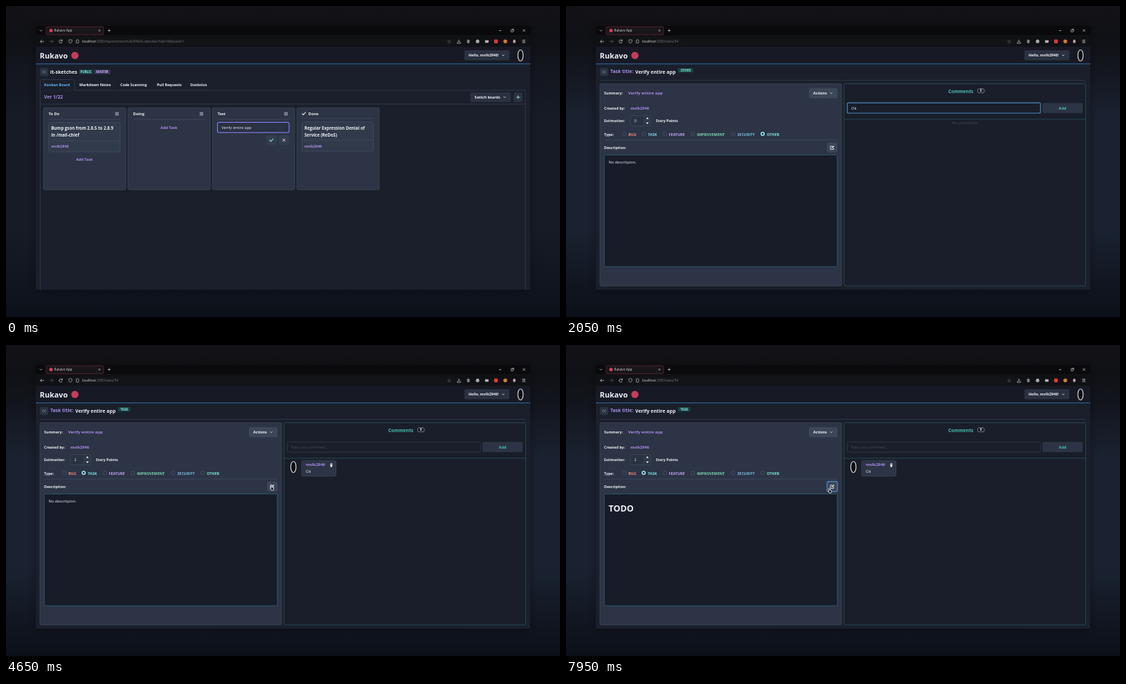
Recreate the animation shown at these times as an HTML page with a canvas. Size 800x450 px, loop 8 s.

```html
<!DOCTYPE html>
<html lang="en">
<head>
<meta charset="utf-8">
<title>Task board</title>
<style>
html, body { margin: 0; width: 100%; height: 100%; overflow: hidden; background: #0e1118; }
canvas { display: block; width: 800px; height: 450px; }
</style>
</head>
<body>
<canvas id="stage"></canvas>
<script>
const LOOP = 8000, STEP = 50;
const USER = 'mvlk2946', APP = 'Rukavo', REPO = 'it-sketches', TASK = 'Verify entire app';
const C = {
  page: '#1a1f2b', panel: '#2c3445', line: '#343d4e', edge: '#434d60', button: '#2a3140', raised: '#3d4657',
  text: '#eceff4', purple: '#a88be6', teal: '#4bbfb5', mint: '#81e6d9', tealLine: '#28545e', focus: '#4b86b8', dim: '#434c5b'
};
const at = { card: 250, leave: 900, load: 1000, actions: 1200, input: 1550, post: 2800, one: 3350, two: 3500,
  kind: 4050, edit: 4700, drag: 5150, type: 5900, preview: 7700 };
// time, x, y, pointer shape held until the next entry
const path = [
  [0, 383, 196, ''], [150, 383, 196, 'hand'], [300, 383, 196, 'hand'], [800, 362, 185, 'hand'], [900, 362, 185, 'arrow'],
  [1000, 362, 185, 'arrow'], [1200, 371, 128, 'hand'], [1250, 371, 128, 'arrow'], [1450, 434, 144, 'beam'],
  [1700, 450, 148, ''], [2200, 450, 148, 'beam'], [2550, 728, 150, 'hand'], [2850, 728, 150, 'arrow'],
  [3300, 117, 164, 'hand'], [3450, 117, 164, 'hand'], [3600, 117, 175, 'hand'], [3700, 117, 175, 'arrow'],
  [3950, 113, 187, 'hand'], [4200, 113, 187, 'arrow'], [4600, 384, 207, 'hand'], [4850, 384, 207, 'beam'],
  [5150, 102, 224, 'beam'], [5400, 44.6, 223, 'arrow'], [5850, 44.6, 223, ''], [6950, 44.6, 223, 'arrow'],
  [7600, 381, 211, 'hand'], [8000, 381, 211, 'hand']
];

const canvas = document.getElementById('stage');
const ctx = canvas.getContext('2d');
const ratio = window.devicePixelRatio || 1;
canvas.width = 800 * ratio;
canvas.height = 450 * ratio;

// y is the middle of the capitals
function text(s, x, y, size = 5.3, color = C.text, weight = 700, align = 'left') {
  ctx.font = `${weight} ${size}px "Open Sans", "Noto Sans", sans-serif`;
  ctx.textAlign = align;
  ctx.fillStyle = color;
  ctx.fillText(s, x, y + size * 0.36);
  return ctx.measureText(s).width;
}
const body = (s, x, y, color = C.text, align = 'left') => text(s, x, y, 5.65, color, 500, align);
function box(x, y, w, h, fill, stroke, r = 2, lw = 0.8) {
  ctx.beginPath();
  ctx.roundRect(x, y, w, h, r);
  if (fill) { ctx.fillStyle = fill; ctx.fill(); }
  if (stroke) { ctx.strokeStyle = stroke; ctx.lineWidth = lw; ctx.stroke(); }
}
function stroke(color, lw, ...p) {
  ctx.beginPath();
  for (let i = 0; i < p.length; i += 2) ctx.lineTo(p[i], p[i + 1]);
  ctx.strokeStyle = color;
  ctx.lineWidth = lw;
  ctx.stroke();
}
function oval(x, y, rx, ry, fill, line, lw = 0.8) {
  ctx.beginPath();
  ctx.ellipse(x, y, rx, ry, 0, 0, Math.PI * 2);
  if (fill) { ctx.fillStyle = fill; ctx.fill(); }
  if (line) { ctx.strokeStyle = line; ctx.lineWidth = lw; ctx.stroke(); }
}
function fillPath(color, d) { ctx.fillStyle = color; ctx.fill(new Path2D(d)); }
const rule = (x, y, x2, color = C.line, lw = 0.8) => stroke(color, lw, x, y, x2, y);
const chevron = (x, y, s = 1.5, color = C.text) => stroke(color, 0.8, x - s, y - s / 2, x, y + s / 2, x + s, y - s / 2);
const plus = (x, y, s, color, lw = 0.8) => { rule(x - s, y, x + s, color, lw); stroke(color, lw, x, y - s, x, y + s); };
const check = (x, y, color) => stroke(color, 1.1, x - 2.6, y, x - 0.8, y + 1.9, x + 2.7, y - 2);
function cross(x, y, s, color, lw = 0.8) {
  stroke(color, lw, x - s, y - s, x + s, y + s);
  stroke(color, lw, x + s, y - s, x - s, y + s);
}
function bars(x, y, s, color) { for (const d of [-1.8, 0, 1.8]) rule(x - s, y + d, x + s, color, 0.8); }
function badge(s, x, y, w, fill, color) {
  box(x, y, w, 6.4, fill, null, 1.2);
  text(s, x + w / 2, y + 3.2, 4.4, color, 700, 'center');
}
const avatar = (x, y) => oval(x, y, 3.8, 8, '#090b0f', '#e4e6e8', 1.1);

function backdrop(mid) {
  const g = ctx.createLinearGradient(0, 0, 0, 450);
  [[0, '#121217'], [0.1, '#101116'], [0.2, '#13161e'], [0.36, mid], [0.72, mid], [0.92, '#0f141e'], [1, '#0b1018']]
    .forEach(s => g.addColorStop(...s));
  ctx.fillStyle = g;
  ctx.fillRect(0, 0, 800, 450);
  ctx.save();
  ctx.shadowColor = 'rgba(0,0,0,.35)';
  ctx.shadowBlur = 12 * ratio;
  box(43, 29, 714, 382.5, C.page, null, 0);
  ctx.restore();
  rule(43, 411.3, 757, '#0a0c11', 1);
}

function browser(board) {
  const grey = '#b8b9bd';
  box(43, 29, 714, 13, '#0a0a0c', null, 0);
  box(43, 42, 714, 17, '#101115', null, 0);
  box(86, 45.5, 562, 11.5, '#131418', null, 1.5);
  box(58, 30, 83, 11.6, '#18161b', '#6d2836', 1.5, 0.7);
  chevron(50.5, 35.5, 1.7, grey);
  oval(65, 35.5, 2.5, 2.5, '#d8405c');
  text(APP + ' App', 69.5, 35.6, 4.7, '#dddde0', 400);
  cross(134.8, 35.5, 1.4, grey, 0.7);
  plus(149, 35.5, 2.1, grey);
  rule(712, 35.6, 715.5, grey);
  box(729.2, 34.5, 3, 3, null, grey, 0, 0.7);
  stroke(grey, 0.7, 730.5, 33.5, 733.2, 33.5, 733.2, 36.3);
  cross(748, 35.5, 1.8, grey);

  rule(49.5, 51.3, 55, grey);
  stroke(grey, 0.8, 51.9, 48.9, 49.5, 51.3, 51.9, 53.7);
  rule(62.5, 51.3, 68, '#5b5c60');
  stroke('#5b5c60', 0.8, 65.6, 48.9, 68, 51.3, 65.6, 53.7);
  ctx.beginPath();
  ctx.arc(79, 51.3, 2.3, 0.3, 5.6);
  ctx.strokeStyle = grey;
  ctx.stroke();
  stroke(grey, 0.8, 81.4, 48.4, 81.4, 50.6, 79.2, 50.6);
  stroke(grey, 0.7, 93, 48.5, 95.3, 49.4, 95.1, 52, 93, 54.2, 90.9, 52, 90.7, 49.4, 93, 48.5);
  box(101.5, 49, 3.4, 4.6, null, grey, 0.5, 0.7);
  const w = text('localhost', 110, 51.4, 4.75, '#dadade', 400);
  const url = board ? `:3000/repositories/${USER}/${REPO}/?tab=0&board=1` : ':3000/tasks/54';
  text(url, 110 + w, 51.4, 4.75, '#73747a', 400);

  text('☆', 640, 51.1, 7, grey, 400, 'center');
  stroke(grey, 0.8, 654, 48.6, 654, 52.3);
  stroke(grey, 0.8, 652.4, 50.8, 654, 52.4, 655.6, 50.8);
  stroke(grey, 0.8, 651.5, 52.5, 651.5, 54, 656.5, 54, 656.5, 52.5);
  box(665.8, 48.8, 3.6, 5, '#85868a', null, 1);
  oval(681, 51.2, 2.5, 2.6, '#a9aaae');
  box(691.7, 49.5, 5.2, 3.8, '#b2b3b7', null, 1);
  box(704.8, 48.5, 5.4, 5.4, '#d83a3a', null, 1);
  oval(721, 51.2, 2.7, 2.7, '#e07b28');
  oval(734, 51.2, 1.9, 2.6, '#b9a2a2');
  bars(747.7, 51.2, 2.3, grey);
}

function appHeader() {
  box(43, 59, 714, 24.8, '#171a24', null, 0);
  text(APP, 48.8, 71.8, 10.8);
  oval(99.5, 71.5, 5.2, 5.2, '#c63c58');
  box(662, 64, 65, 14.5, C.button);
  text(`Hello, ${USER}!`, 668, 71.5);
  chevron(718, 71.3);
  avatar(743, 71.5);
  rule(43, 83.8, 757, '#2f6ba5', 1.1);
  box(49, 89.5, 12, 12, C.button);
  for (const x of [54.5, 57.5]) stroke('#9aa3b2', 0.8, x, 93.4, x - 2, 95.5, x, 97.6);
}

function card(x, y, lines) {
  const h = 22 + lines.length * 10.2;
  box(x, y, 103, h, '#313a4b', C.edge, 2);
  lines.forEach((s, i) => text(s, x + 3.4, y + 8.6 + i * 10, 6.15));
  rule(x, y + h - 16, x + 103, C.edge, 0.6);
  text(USER, x + 3.4, y + h - 7.5, 5.3, C.purple);
}

function board(t) {
  text(REPO, 63.8, 95, 7.2);
  badge('PUBLIC', 105.5, 92, 20, '#1f4549', C.mint);
  badge('MASTER', 127, 92, 24, '#393258', '#c9b3f3');
  rule(49, 122, 750);
  box(49.4, 106.5, 49.6, 15.6, C.page, C.line, 1.5);
  rule(50, 122, 98.6, C.page, 1.4);
  [['Kanban Board', 55], ['Markdown Notes', 106], ['Code Scanning', 165], ['Pull Requests', 218], ['Statistics', 266]]
    .forEach(([s, x], i) => text(s, x, 114.2, 5.3, i ? C.text : '#63b3ed'));
  stroke(C.line, 0.8, 49.4, 122, 49.4, 411);
  stroke(C.line, 0.8, 750, 122, 750, 411);
  text('Ver 1/22', 55, 131.8, 6.7, C.purple);
  rule(49, 142, 750);
  box(670.5, 125, 58.5, 14, C.button);
  text('Switch boards', 676.5, 132);
  chevron(720, 131.9);
  box(733, 125, 13, 14, C.button);
  plus(739.6, 132, 2.8, '#9adbe6', 0.9);

  ['To Do', 'Doing', 'Test', 'Done'].forEach((name, i) => {
    const x = 54 + i * 122;
    const done = i === 3;
    box(x, 147.3, 119, 118.6, C.panel, '#3e4859', 2);
    text(name, x + (done ? 16.5 : 7.5), 155.8, 5.7);
    if (done) check(x + 10.2, 155.5, C.text);
    else bars(x + 106.3, 156, 2.6, '#cbd2dc');
    rule(x + 7.5, done ? 162.8 : 164, x + 111, C.edge, 0.7);
  });
  const add = (x, y) => text('Add Task', x, y, 5.4, C.purple, 700, 'center');
  card(61.8, 168.6, ['Bump gson from 2.8.5 to 2.8.9', 'in /mail-chief']);
  card(427.5, 167.7, ['Regular Expression Denial of', 'Service (ReDoS)']);
  add(113.3, 221.8);
  add(235.3, 176);
  if (t < at.card) {
    box(305.4, 168.3, 103.4, 14.8, '#2a3142', '#7d78de', 2, 1.2);
    body(TASK, 311.3, 176);
    box(376, 187, 15, 14, '#343d4e');
    check(383.3, 194, C.mint);
    box(394, 187, 14.7, 14, '#343d4e');
    cross(401.3, 194, 2, C.text, 0.9);
  } else {
    card(305.4, 168.6, [TASK]);
    add(357, 211.6);
  }
}

function editIcon(x, y) {
  stroke(C.text, 0.8, x + 0.3, y - 2, x - 2.5, y - 2, x - 2.5, y + 2.7, x + 2, y + 2.7, x + 2, y + 0.3);
  stroke(C.text, 1.4, x - 0.6, y + 0.8, x + 2.5, y - 2.4);
}
function eyeIcon(x, y) {
  oval(x, y, 3.3, 2.2, C.text);
  oval(x, y, 1.1, 1.1, '#3d4657');
}

function description(t, mouse) {
  const editing = t >= at.edit && t < at.preview;
  const focused = t >= at.preview;
  text('Description:', 55, 205.2);
  box(377, 197.5, 15, 14.6, C.raised, focused ? C.focus : null, 2, 1.3);
  (editing ? eyeIcon : editIcon)(384.4, 204.8);
  box(55.2, 215.4, 336.6, 161.8, '#171c28', editing ? '#4f8fc0' : '#2f6678', 1.5, 0.8);
  if (focused) return text('TODO', 61.5, 236.2, 12.5);
  if (!editing) return body('No descritpion.', 61.5, 226.3);
  if (t >= at.type) {
    const typed = '# TODO'.slice(0, 1 + Math.floor((t - at.type) / 150));
    const w = body(typed, 61.5, 223);
    if ((t - at.type) % 1000 < 500) stroke(C.text, 0.6, 62.2 + w, 219.8, 62.2 + w, 226.4);
    return;
  }
  if (t >= at.drag) {
    const left = Math.min(102, Math.max(61.3, mouse.x));
    box(left, 218.8, 102 - left, 8.6, '#1b6dbb', null, 0);
  }
  body('No descritpion.', 61.5, 223);
}

function details(t, mouse) {
  const kind = t < at.kind ? 'OTHER' : 'TASK';
  text('Task title:', 64, 95, 6.9, C.purple);
  text(TASK, 100, 95, 7);
  badge(kind, 162, 89.9, kind === 'TASK' ? 17.5 : 21.5, '#1f4549', C.mint);
  rule(49, 107.6, 750);

  box(49, 112.4, 349, 292.6, C.panel, '#3d485b', 2);
  text('Summary:', 55, 126.3);
  text(TASK, 89.8, 126.3, 6, C.purple);
  const open = t >= at.actions && t < at.input;
  box(351, 118.8, 41, 14.6, C.raised, open ? C.focus : null, 2, 1.3);
  text('Actions', 357, 126.3);
  chevron(383, 126.1);
  text('Created by:', 55, 147.6);
  text(USER, 93, 147.6, 5.65, C.purple);
  text('Estimation:', 55, 166.3);
  const typing = t >= at.one && t < at.kind - 100;
  box(93, 158.6, 29, 14.8, '#2a3242', typing ? C.focus : '#414c5e', 2, typing ? 1.3 : 0.8);
  body(t < at.one ? '0' : t < at.two ? '1' : '2', 98.6, 166.3);
  if (typing) stroke(C.text, 0.6, 102.5, 163, 102.5, 169.4);
  stroke('#414c5e', 0.7, 113, 159, 113, 173);
  rule(113, 166, 122, '#414c5e', 0.7);
  fillPath(C.text, 'M115.4 163.4 L117.5 160.9 L119.6 163.4Z M115.4 168.6 L117.5 171.1 L119.6 168.6Z');
  text('Story Points', 129.8, 166.3);
  text('Type:', 55, 185.6);
  [['BUG', 84, '#ee8a84'], ['TASK', 112.2, '#83d9e6'], ['FEATURE', 142.5, '#c0a5ef'], ['IMPROVEMENT', 183, '#7fd1b0'],
    ['SECURITY', 241.4, '#79bde9'], ['OTHER', 284, C.mint]].forEach(([name, x, color]) => {
    if (name === kind) {
      oval(x, 185, 3, 3, '#8de0ea');
      oval(x, 185, 1.3, 1.3, '#1d2a38');
    } else oval(x, 185, 2.6, 2.6, null, '#4b566a', 0.8);
    text(name, x + 6, 185.6, 5.4, color);
  });
  rule(55, 194, 392, C.edge);
  description(t, mouse);
}

function comments(t) {
  box(401.6, 112.4, 348.8, 292.6, '#191e2a', C.tealLine, 2, 0.8);
  text('Comments', 552, 123.4, 6.7, C.teal);
  box(594.4, 119.7, 9.6, 6, null, '#8b95a5', 2, 0.7);
  text('0', 599.2, 122.8, 4.3, C.text, 700, 'center');
  const focused = t >= at.input && t < 2600;
  box(406.2, 140.2, 279, 14.8, null, focused ? C.focus : '#303b4b', 2, focused ? 1.2 : 0.8);
  const typed = t >= 1850 && t < 2650 ? (t < 2000 ? 'O' : 'Ok') : '';
  body(typed || 'Add new comment...', 412, 148, typed ? C.text : C.dim);
  const hot = t >= 2600 && t < 3250;
  box(688, 140.2, 58, 14.8, hot ? C.raised : C.panel, hot ? C.focus : null, 2, 1.3);
  text('Add', 717, 147.8, 5.5, C.teal, 700, 'center');
  rule(402, 163.8, 750, C.tealLine);
  if (t < at.post) return body('No comments', 576, 169.4, C.dim, 'center');
  avatar(415, 176.5);
  box(427, 167.2, 49.5, 22.6, C.panel, '#3e4859', 2);
  text(USER, 433, 173.2, 5.85, C.purple);
  fillPath(C.text, 'M467.8 171.7h3.9v.8h-3.9z M468.2 172.9h3.1l-.3 3.7h-2.5z M469.1 171h1.3v.7h-1.3z');
  body('Ok', 433, 182.8);
}

function pointerAt(t) {
  const i = Math.max(0, path.findIndex(p => p[0] > t) - 1);
  const [t0, x0, y0, shape] = path[i];
  const [t1, x1, y1] = path[i + 1];
  const k = (t - t0) / (t1 - t0);
  const e = k * k * (3 - 2 * k);
  return { x: x0 + (x1 - x0) * e, y: y0 + (y1 - y0) * e, shape };
}
function pointer({ x, y, shape }) {
  if (!shape) return;
  ctx.save();
  ctx.translate(x, y);
  if (shape === 'beam') {
    stroke('#e6e8ec', 0.8, 0, -3, 0, 3);
    rule(-1.5, -3.2, 1.5, '#e6e8ec');
    rule(-1.5, 3.2, 1.5, '#e6e8ec');
  } else {
    const d = shape === 'arrow' ? 'M-1 -3.2 L3.2 .4 L-1 3.2Z'
      : 'M-1.4 -3.2 Q-.6 -4 0 -3 L.3 -1 Q2.4 -1 2.4 .4 L2 2.8 Q.4 3.8 -1 2.8 L-2.4 .4 Q-2.2 -.4 -1.2 .2Z';
    const p = new Path2D(d);
    ctx.fillStyle = '#11141b';
    ctx.fill(p);
    ctx.strokeStyle = '#eef0f3';
    ctx.lineWidth = 0.9;
    ctx.stroke(p);
  }
  ctx.restore();
}

function draw(now) {
  const t = Math.floor((now % LOOP) / STEP) * STEP;
  const onBoard = t < at.leave;
  const mouse = pointerAt(t);
  ctx.setTransform(ratio, 0, 0, ratio, 0, 0);
  backdrop(onBoard ? '#161b26' : t < at.load ? '#171c27' : '#1a2231');
  browser(onBoard);
  appHeader();
  if (onBoard) board(t);
  else if (t < at.load) rule(49, 107.6, 750);
  else {
    details(t, mouse);
    comments(t);
  }
  pointer(mouse);
  requestAnimationFrame(() => draw(performance.now()));
}
draw(performance.now());
</script>
</body>
</html>
```
